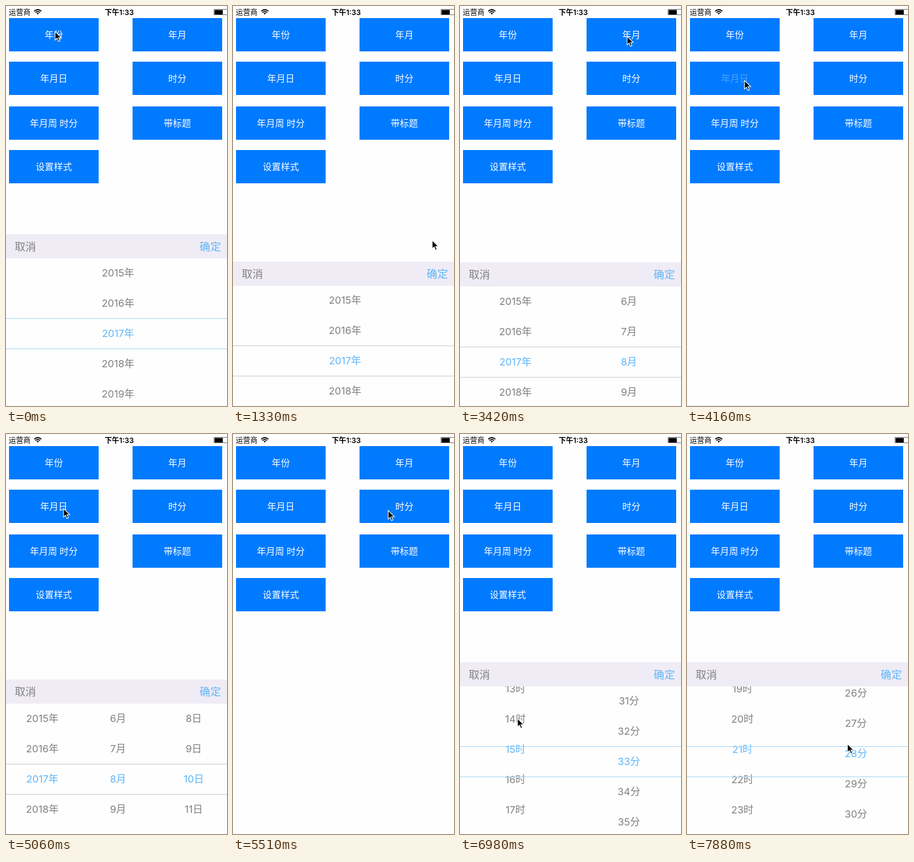
Write an HTML page that moves like this. It is 365 px wide and 661 px high and loops after 8 s.

```html
<!DOCTYPE html>
<html lang="zh-CN">
<head>
<meta charset="utf-8">
<style>
html, body { margin: 0; height: 100%; overflow: hidden; background: #fefefe; }
svg { display: block; width: 100vw; height: 100vh; font-family: Inter, "Noto Sans CJK SC", "Noto Sans CJK", sans-serif; }
</style>
</head>
<body>
<svg viewBox="0 0 365 661">
  <g font-size="12">
    <text x="4.5" y="14.5">运营商</text>
    <text x="187" y="14.5" text-anchor="middle" font-weight="600">下午1:33</text>
  </g>
  <g fill="none" stroke="#000" stroke-width="1.7">
    <path d="M46.6 8.6Q52.5 3.4 58.4 8.6M48.7 10.8Q52.5 7.4 56.3 10.8"/>
    <path d="M50.6 12L52.5 14.2L54.4 12Q52.5 10.6 50.6 12Z" fill="#000" stroke="none"/>
  </g>
  <path d="M366 5.5H343.5V14.5H366" fill="none" stroke="#777"/>
  <path d="M344.5 6.5h13.5v7.5h-13.5z"/>
  <g id="buttons" fill="#fff" font-size="15" text-anchor="middle"></g>
  <g id="sheet"></g>
  <path id="cursor" d="M0 0V14.2L3.3 11.2L5.6 16.6L8 15.6L5.7 10.3H10.2Z" stroke="#fff" stroke-width="1.1"/>
</svg>
<script>
const $ = id => document.getElementById(id);
const LOOP = 8000, GRAY = '#808080', BLUE = '#5fb5f8';
const clamp = u => Math.min(1, Math.max(0, u));
const smooth = u => (u = clamp(u), u * u * (3 - 2 * u));

const labels = ['年份', '年月', '年月日', '时分', '年月周 时分', '带标题', '设置样式'];
const tops = [20, 92, 166, 238];
$('buttons').innerHTML = labels.map((s, i) => {
  const x = i % 2 * 204 + 5, y = tops[i >> 1];
  return `<rect x="${x}" y="${y}" width="148" height="55" fill="#007aff"/>
    <text x="${x + 74}" y="${y + 33.2}">${s}</text>`;
}).join('');
const captions = $('buttons').querySelectorAll('text');

// Picture is refreshed in steps inside each active span, and rests between them.
const spans = [[450, 2670, 15], [3420, 4460, 7], [5060, 7880, 19]];
function stepped(t) {
  let q = 0;
  for (const [start, end, n] of spans) {
    if (t < start) break;
    const d = (end - start) / n;
    q = start + Math.min(n, Math.floor((t - start) / d + 0.1)) * d;
  }
  return q;
}

// Keys are [time, ...values]; eased between neighbours.
function track(keys, t, ease = smooth) {
  let i = 0;
  while (i < keys.length - 2 && t >= keys[i + 1][0]) i++;
  const [a, b] = [keys[i], keys[i + 1]];
  const u = ease(clamp((t - a[0]) / (b[0] - a[0])));
  return a.slice(1).map((v, k) => v + (b[k + 1] - v) * u);
}
const out = u => 1 - (1 - u) ** 2;

const pointer = [
  [380, 81, 42], [1190, 329, 387], [1480, 329, 387], [2220, 278, 47], [2380, 278, 47],
  [2670, 276, 50], [3500, 276, 50], [4140, 95, 123], [5070, 95, 123], [5650, 286, 127],
  [6105, 286, 127], [6540, 95, 590], [6690, 95, 590], [6990, 95, 470], [7290, 266, 432],
  [7590, 265, 512], [8000, 265, 512]
];
const hours = [[6690, 13], [6990, 15.4], [7890, 21.4]];
const minutes = [[7290, 33], [7590, 31.4], [7880, 28.26]];

const year = [2017, '年'], month = [8, '月'], day = [10, '日'];
const sheets = [
  { open: -999, close: 1262, button: 0, wheels: () => [year] },
  { open: 2246, close: 3343, button: 1, wheels: () => [year, month] },
  { open: 4150, close: 5001, button: 2, wheels: () => [year, month, day] },
  { open: 5665, close: 9999, button: 3,
    wheels: t => [[track(hours, t, out)[0], '时'], [track(minutes, t, out)[0], '分']] }
];
const centers = [[], [185], [91.5, 279], [60, 185, 310]];

function wheel([pos, unit], x, y) {
  const mid = Math.round(pos);
  let s = '';
  for (let n = mid - 3; n <= mid + 3; n++)
    s += `<text x="${x}" y="${y + 170 + (n - pos) * 50}" fill="${n === mid ? BLUE : GRAY}">${n}${unit}</text>`;
  return s;
}

function sheetMarkup(s, t) {
  const shift = 1 - smooth((t - s.open) / 300) + smooth((t - s.close) / 300);
  if (shift >= 1) return '';
  const y = 377 + 284 * shift;
  const wheels = s.wheels(t);
  const rule = t > s.close ? '#ccc' : '#a3d7f7';
  return `<rect y="${y}" width="365" height="284" fill="#fefefe"/>
    <g font-size="16.5" text-anchor="middle">${wheels.map((w, i) => wheel(w, centers[wheels.length][i], y)).join('')}</g>
    <path d="M0 ${Math.round(y) + 139.5}h365m-365 50h365" stroke="${rule}"/>
    <rect y="${y - 40}" width="365" height="40" fill="#fefefe"/>
    <rect y="${y}" width="365" height="40" fill="#efecf6"/>
    <g font-size="17.6"><text x="14.5" y="${y + 26.6}" fill="${GRAY}">取消</text>
    <text x="355" y="${y + 26.6}" text-anchor="end" fill="${BLUE}">确定</text></g>`;
}

let shown = -1;
function frame(now) {
  const t = stepped(now % LOOP);
  if (t !== shown) {
    shown = t;
    $('sheet').innerHTML = sheets.map(s => sheetMarkup(s, t)).join('');
    for (const s of sheets) {
      const pressed = t > s.open - 50;
      captions[s.button].setAttribute('opacity', pressed ? 0.3 + 0.7 * clamp((t - s.open - 110) / 210) : 1);
    }
    $('cursor').setAttribute('transform', `translate(${track(pointer, t)})`);
  }
  requestAnimationFrame(frame);
}
const begin = performance.now();
requestAnimationFrame(function tick(now) { frame(Math.max(0, now)); });
</script>
</body>
</html>
```
